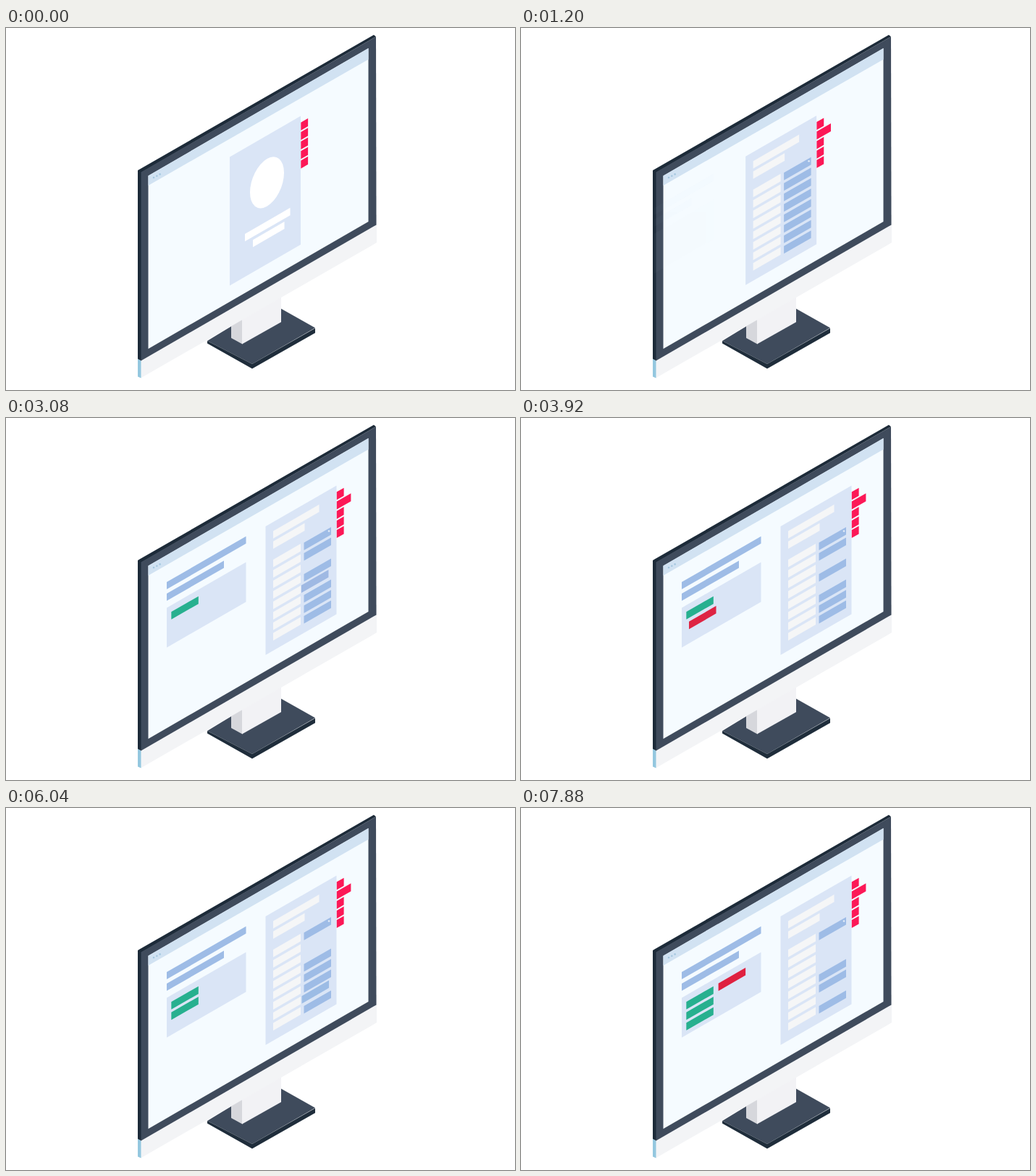
Recreate the animation shown at these times as an HTML page. Size 703 by 501 pixels, loop 8 s.

```html
<!DOCTYPE html>
<html lang="en">
<head>
<meta charset="utf-8">
<title>Sorting cards</title>
<style>
  html, body { margin: 0; width: 100%; height: 100%; overflow: hidden; background: #fff; }
  svg { display: block; width: 703px; height: 501px; }
</style>
</head>
<body>
<svg id="stage" viewBox="0 0 703 501" xmlns="http://www.w3.org/2000/svg">
  <defs>
    <clipPath id="body"><path d="M184 196L511 8V297L184 485Z"/></clipPath>
  </defs>
  <g id="monitor">
    <path fill="#3f4b5c" d="M278 433L365 380L427 415L340 465Z"/>
    <path fill="#1f2d3b" d="M278 433L340 465L427 415.5V422L340 471.5L278 436.5Z"/>
    <path fill="#d6d7dc" d="M311 408L326.500 400V437.500L311 429Z"/>
    <path fill="#f2f2f5" d="M326 398L380 368V407L326 437.500Z"/>
    <path fill="#f3f4f6" d="M186 460L512 272V297L186 484.500Z"/>
    <path fill="#94c7df" d="M182 458L186.500 460V484.500L182 482.500Z"/>
    <path fill="#1d2b39" d="M182 197L508 9.500L511 12L187 200V460.500L182 458Z"/>
    <path fill="#3f4b5c" d="M186.500 199.500L511 12L511.500 272.500L186.500 460.500Z"/>
    <path fill="#f5fbff" d="M196.500 204.500L500.500 28V268L196.500 444Z"/>
    <path fill="#d1e2f2" d="M196.500 204.500L500.500 28V43.500L196.500 218Z"/>
    <g fill="#a6c8e0">
      <circle cx="204" cy="207" r="1.300"/>
      <circle cx="208.300" cy="204.700" r="1.300"/>
      <circle cx="212.600" cy="202.400" r="1.300"/>
    </g>
  </g>
  <g clip-path="url(#body)"><g id="board"></g></g>
  <g id="card">
    <g id="sheet"></g>
    <g id="cover"></g>
    <g id="list"></g>
  </g>
</svg>
<script>
const NS = 'http://www.w3.org/2000/svg';
const SLOPE = 0.577, LOOP = 8000, FRAME = 40;
const PALE = '#dae5f6', BLUE = '#9ebce6', WHITE = '#f5f6f7', PINK = '#fc1857';
const GREEN = [39, 176, 143], RED = [223, 33, 64], BASE = [158, 188, 230];
const $ = id => document.getElementById(id);

// Upright parallelogram on the screen plane; x, y is its top left corner.
function slab(x, y, w, h) {
  const rise = w * SLOPE;
  return `M${x} ${y}L${x + w} ${y - rise}V${y - rise + h}L${x} ${y + h}Z`;
}

function add(parent, fill, ...box) {
  const path = document.createElementNS(NS, 'path');
  path.setAttribute('d', slab(...box));
  path.setAttribute('fill', fill);
  return parent.appendChild(path);
}

function dot(parent, fill, r, transform) {
  const c = document.createElementNS(NS, 'circle');
  c.setAttribute('r', r);
  c.setAttribute('fill', fill);
  c.setAttribute('transform', transform);
  return parent.appendChild(c);
}

const ROW = { x: 411.5, y: 172.6, w: 37.5, h: 10.5, step: 14.5 };
const rowY = i => ROW.y + i * ROW.step;

// Board on the left
const board = $('board');
add(board, BLUE, 222, 227, 109.5, 10);
add(board, BLUE, 222, 243, 79, 10);
add(board, PALE, 222, 262.7, 109.5, 55);

// Card with its tabs
const sheet = $('sheet');
add(sheet, PALE, 358.5, 150, 98, 178);
const tabs = [];
for (let i = 0; i < 5; i++) tabs.push(add(sheet, PINK, 456.8, 102.3 + i * 13.2, 9.8, 11));

const cover = $('cover');
dot(cover, '#fff', 23.5, `matrix(1 ${-SLOPE} 0 1.4 410 185.5)`);
add(cover, '#fff', 379.5, 256.5, 62.5, 10.3);
add(cover, '#fff', 390.5, 264.8, 43.5, 10);

const list = $('list');
add(list, WHITE, 369, 156.4, 63.5, 10.3);
add(list, WHITE, 369, 170.7, 43.5, 10.3);
const rows = [];
for (let i = 0; i < 8; i++) add(list, WHITE, 369, 196 + i * ROW.step, 38, ROW.h);
for (let i = 0; i < 8; i++) rows.push(add(list, BLUE, ROW.x, rowY(i), ROW.w, ROW.h));
dot(list, '#e3ecf8', 1.3, 'translate(446 156.5)');

// Cards dragged onto the board; "back" is when a wrong one returns.
const slot = (col, n) => ({ x: 228.3 + col * 44.3, y: 268.3 + n * ROW.step - col * 25.6 });
const moves = [
  { row: 2, to: slot(0, 0), at: [2065, 2755], color: GREEN },
  { row: 4, to: slot(0, 1), at: [3030, 3635], back: [3865, 4515], color: RED },
  { row: 1, to: slot(0, 1), at: [4825, 5515], color: GREEN },
  { row: 6, to: slot(0, 2), at: [5985, 6715], color: GREEN },
  { row: 3, to: slot(1, 0), at: [7185, 7875], color: RED }
];

function ease(t, from, to) {
  const p = Math.min(1, Math.max(0, (t - from) / (to - from)));
  return p * p * (3 - 2 * p);
}

const mix = (a, b, p) => `rgb(${a.map((v, i) => Math.round(v + (b[i] - v) * p))})`;
const shift = (el, x, y) => el.setAttribute('transform', `translate(${x} ${y})`);

function draw(t) {
  const open = ease(t, 0, 360);
  cover.setAttribute('opacity', 1 - open);
  tabs[1].setAttribute('d', slab(456.8, 115.5, 9.8 + 9.8 * open, 11));

  const show = ease(t, 525, 840);
  list.setAttribute('opacity', show);
  shift(list, -9 * (1 - show), 0);

  const slide = ease(t, 1165, 1555), rest = 1 - slide;
  shift($('card'), -49.5 * rest, 28.4 * rest);
  shift(board, -67 * rest, 67 * SLOPE * rest);
  board.setAttribute('opacity', slide);

  for (const m of moves) {
    const p = ease(t, ...m.at) - (m.back ? ease(t, ...m.back) : 0);
    shift(rows[m.row], (m.to.x - ROW.x) * p, (m.to.y - rowY(m.row)) * p);
    rows[m.row].setAttribute('fill', mix(BASE, m.color, p));
  }
}

function tick(now) {
  draw(Math.floor(((now + 1) % LOOP) / FRAME) * FRAME);
  requestAnimationFrame(tick);
}
draw(0);
requestAnimationFrame(tick);
</script>
</body>
</html>
```
